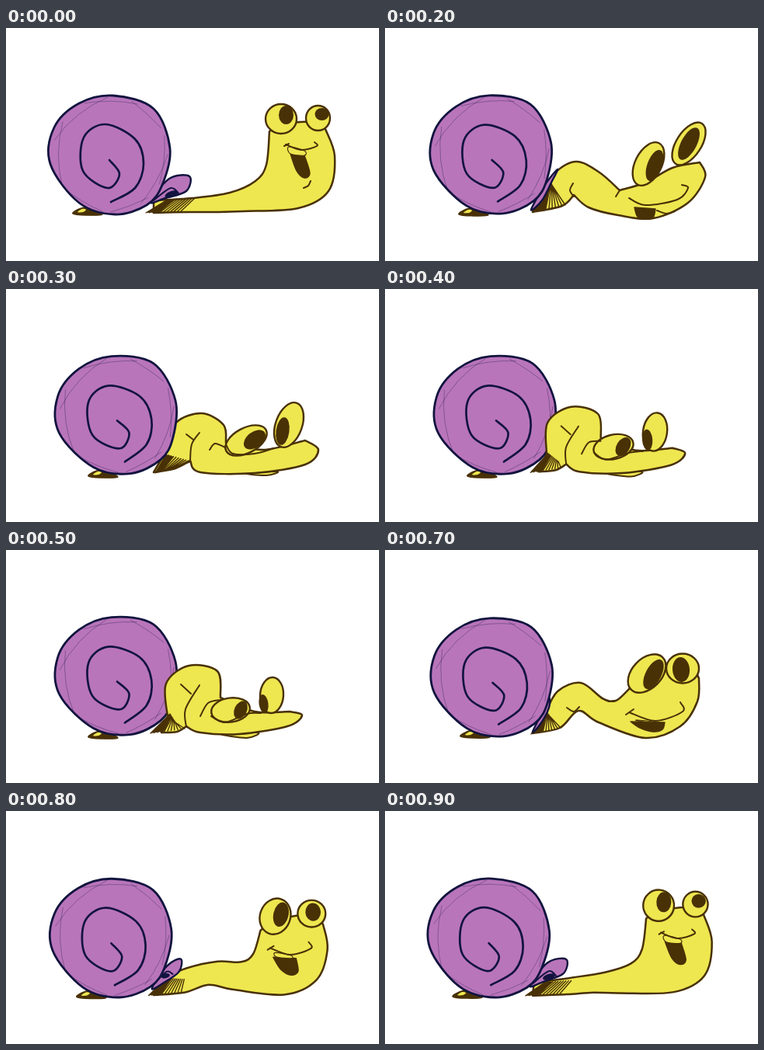
An HTML page with a canvas for the animation above (1000 ms loop, 480x300 px).

```html
<!DOCTYPE html>
<html lang="en">
<head>
<meta charset="utf-8">
<title>Snail</title>
<style>
html, body { margin: 0; width: 100%; height: 100%; overflow: hidden; background: #fff; }
canvas { display: block; }
</style>
</head>
<body>
<canvas id="stage" width="480" height="300"></canvas>
<script>
const ctx = document.getElementById('stage').getContext('2d');
const SKIN = '#eee750', BROWN = '#493106', PURPLE = '#b975ba', NAVY = '#12143f';
const STEP = 100;

// Key points are joined by smooth curves: "/" makes a corner, ";" starts a new line.
const RIM = '138,87 190,104 211,155 201,202 181,228 140,240 94,225 57,175 62,128 94,97';
const SPIRAL = '133,170 146,188 131,206 99,184 100,141 128,124 166,143 177,175 166,206 135,224';
const TAIL = '86,239 94,233 106,231 124,240 103,241';
const SHINE = '92,237 98,233 103,234 99,237';

// Shell place is x, y, turn; eyes and pupils are x, y, rx, ry, turn.
const up = {
  place: [0, 0, 0],
  body: '190,222 240,219 288,212 321,197 335,176 339,133 / 355,125 390,121 411,130 / 423,165 415,210 376,232 305,236 270,237 235,237 190,238',
  foot: '206,222 243,219 180,238 225,236',
  lip: '186,224 210,194 236,191 232,210 205,219',
  curl: '190,222 212,206 223,214',
  fold: [213, 214, 9, 4, -20],
  eyes: [[354, 117, 20, 19, 0], [401.5, 116, 15.5, 16, 0]],
  pupils: [[360.5, 112, 9.5, 12, 0], [406.5, 111, 9, 8, 0]],
  mouth: '366,162 384,164 / 391,187 384,193 374,184 366,162',
  tooth: '364,153 384,158 384,164 366,162',
  lines: '360,150 380,157 400,152 397,147;358,152 364,149',
  crease: '383,206 389,203 392,197'
};

const lift = {
  place: [5.5, 1, -6],
  body: '205,213 222,182 252,171 280,191 297,194 313,180 / 335,160 390,150 404,165 / 402,195 380,227 335,242 275,222 249,207 225,229 190,236',
  foot: '207,207 212,214 188,237 226,229',
  lip: '190,234 204,206 211,190 211,203 200,224',
  curl: '192,222 200,208 204,205',
  fold: [195, 210, 2, 2, 0],
  eyes: [[337, 159, 19, 29, 44], [383, 152.5, 21, 19, 0]],
  pupils: [[345.5, 160, 10, 21, 28], [381, 154, 11, 16, -5]],
  mouth: '316,221 360,222 / 357,231 345,234 328,229 316,221',
  tooth: '325,219 345,221 345,222 325,220',
  lines: '314,209 348,220 383,208 380,196;310,212 320,205',
  crease: '234,203 243,208 250,202;279,191 288,195 296,194'
};

const dive = {
  place: [4.5, 0, -6],
  body: '200,215 218,187 246,172 276,186 302,209 / 335,199 370,180 405,173 / 412,192 390,225 345,245 300,241 262,231 243,215 / 228,229 190,237',
  foot: '212,196 216,204 190,237 232,228',
  lip: '188,234 205,203 222,182 214,199 202,222',
  eyes: [[339, 175, 17, 30, 27], [391, 149, 16, 31, 33]],
  pupils: [[347, 177, 9.5, 21, 20], [391, 149, 10, 23, 28]],
  mouth: '321,231 348,233 / 345,244 335,246 325,243 321,231',
  lines: '314,219 335,228 376,221 390,206 382,202;350,235 362,239 373,236',
  crease: '302,209 297,217;242,200 238,209 243,217'
};

const sink = {
  place: [10, -0.5, -8.5],
  chin: '305,237 335,240 349,235',
  body: '208,205 219,172 252,160 280,175 283,198 / 330,207 385,195 / 402,207 385,226 320,237 250,236 237,221 / 218,231 190,236',
  foot: '206,213 238,222 192,237 216,231',
  eyes: [[309, 195, 29, 16, -28], [364, 175, 17, 30, 20]],
  pupils: [[320, 194, 16, 10, -38], [356, 183, 8.5, 18, 8]],
  lines: '283,200 292,212 320,212 345,205;262,207 269,199 282,204;237,221 239,200 249,185;232,187 241,194'
};

const rest = {
  place: sink.place,
  front: true,
  chin: '277,237 310,242 324,235',
  body: '208,215 206,172 235,149 272,156 276,190 / 320,208 365,208 / 381,213 362,227 300,237 250,235 232,227 / 220,234 200,235',
  foot: '211,211 218,222 186,236 230,230',
  eyes: [[289, 206, 25, 15.5, -8], [342, 187, 15, 23, 4]],
  pupils: [[302, 206, 12, 8, -65], [331.5, 198, 6, 12, -8]],
  lines: '264,214 282,222 310,211 328,210;250,214 260,197 276,193;232,228 231,205 249,174;225,173 238,185'
};

const lerp = (a, b, t) => a + (b - a) * t;
const easeOut = p => 1 - (1 - p) ** 2;
const radians = deg => deg * Math.PI / 180;

function blend(a, b, t) {
  if (typeof b === 'number') return lerp(a, b, t);
  if (Array.isArray(b)) return b.map((v, i) => blend(a[i], v, t));
  if (typeof b !== 'string') return b;
  const old = a.match(/[\d.]+/g);
  let i = 0;
  return b.replace(/[\d.]+/g, n => lerp(+old[i++], +n, t));
}

function between(from, to, p) {
  const pose = {};
  for (const key in to) if (key !== 'crease') pose[key] = blend(from[key], to[key], easeOut(p));
  return pose;
}

const points = text => text.trim().split(/\s+/).map(p => p.split(',').map(Number));

function curve(p, closed) {
  const n = p.length;
  const at = i => closed ? p[(i + n) % n] : p[Math.max(0, Math.min(n - 1, i))];
  for (let i = 0; i < (closed ? n : n - 1); i++) {
    const [a, b, c, d] = [at(i - 1), at(i), at(i + 1), at(i + 2)];
    ctx.bezierCurveTo(b[0] + (c[0] - a[0]) / 6, b[1] + (c[1] - a[1]) / 6,
      c[0] - (d[0] - b[0]) / 6, c[1] - (d[1] - b[1]) / 6, c[0], c[1]);
  }
}

function ink(fill, stroke, width) {
  if (fill) {
    ctx.fillStyle = fill;
    ctx.fill();
  }
  if (stroke) {
    ctx.strokeStyle = stroke;
    ctx.lineWidth = width;
    ctx.stroke();
  }
}

function paint(text, fill, stroke, width) {
  if (!text) return;
  ctx.beginPath();
  for (const line of text.split(';')) {
    const parts = line.split('/').map(points);
    ctx.moveTo(...parts[0][0]);
    parts.forEach((p, i) => curve(i ? [parts[i - 1].at(-1), ...p] : p, fill && parts.length === 1));
    if (fill) ctx.closePath();
  }
  ink(fill, stroke, width);
}

function oval([x, y, rx, ry, turn], fill, stroke, width) {
  ctx.beginPath();
  ctx.ellipse(x, y, rx, ry, radians(turn), 0, 2 * Math.PI);
  ink(fill, stroke, width);
}

// Dark near the shell, thinning out into strokes.
function drawFoot(text) {
  const [a, b, c, d] = points(text);
  const top = t => [lerp(a[0], b[0], t), lerp(a[1], b[1], t)];
  const low = t => [lerp(c[0], d[0], t), lerp(c[1], d[1], t)];
  ctx.beginPath();
  for (const p of [top(0), top(0.3), low(0.4), low(0)]) ctx.lineTo(...p);
  ink(BROWN);
  ctx.beginPath();
  for (let t = 0; t <= 1; t += 0.1) {
    ctx.moveTo(...top(t));
    ctx.lineTo(...low(t));
  }
  ink(null, BROWN, 1.4);
}

function drawSketch() {
  const rim = (angle, r) => [134 + r * Math.cos(angle), 163 + r * Math.sin(angle)];
  ctx.beginPath();
  for (let i = 0; i < 8; i++) {
    const from = i * 0.85, span = 1 + 0.3 * Math.sin(i * 5);
    ctx.moveTo(...rim(from, 74));
    ctx.quadraticCurveTo(...rim(from + span / 2, 72), ...rim(from + span, 74));
  }
  ctx.globalAlpha = 0.45;
  ink(null, NAVY, 0.7);
  ctx.globalAlpha = 1;
}

function drawShell([x, y, turn]) {
  ctx.save();
  ctx.translate(132 + x, 170 + y);
  ctx.rotate(radians(turn));
  ctx.translate(-132, -170);
  paint(RIM, PURPLE, NAVY, 2.8);
  drawSketch();
  paint(SPIRAL, null, NAVY, 2.7);
  ctx.restore();
}

function drawTail([x]) {
  ctx.save();
  ctx.translate(2 * x, 0.2 * x);
  paint(TAIL, BROWN, BROWN, 1.4);
  paint(SHINE, SKIN);
  ctx.restore();
}

function drawBody(pose) {
  paint(pose.chin, SKIN, BROWN, 2);
  paint(pose.body, SKIN, BROWN, 2.5);
  drawFoot(pose.foot);
  paint(pose.lip, PURPLE, NAVY, 2.4);
  paint(pose.curl, null, NAVY, 2);
  if (pose.fold) oval(pose.fold, NAVY);
}

function drawFace(pose) {
  for (const eye of pose.eyes) oval(eye, SKIN, BROWN, 2.4);
  for (const pupil of pose.pupils) oval(pupil, BROWN);
  paint(pose.mouth, BROWN, BROWN, 1.4);
  paint(pose.tooth, SKIN, BROWN, 1.2);
  paint(pose.lines, null, BROWN, 2);
  paint(pose.crease, null, BROWN, 2);
}

function draw(pose) {
  ctx.fillStyle = '#fff';
  ctx.fillRect(0, 0, 480, 300);
  ctx.lineCap = ctx.lineJoin = 'round';
  drawTail(pose.place);
  if (pose.front) drawShell(pose.place);
  drawBody(pose);
  if (!pose.front) drawShell(pose.place);
  drawFace(pose);
}

const cycle = [
  up, up, dive, sink, between(sink, rest, 1 / 2), rest, rest,
  lift, between(lift, up, 1 / 3), between(lift, up, 2 / 3)
];
const start = performance.now();

function tick() {
  const t = Math.max(0, performance.now() - start);
  draw(cycle[Math.floor(t / STEP) % cycle.length]);
  requestAnimationFrame(tick);
}
tick();
</script>
</body>
</html>
```
